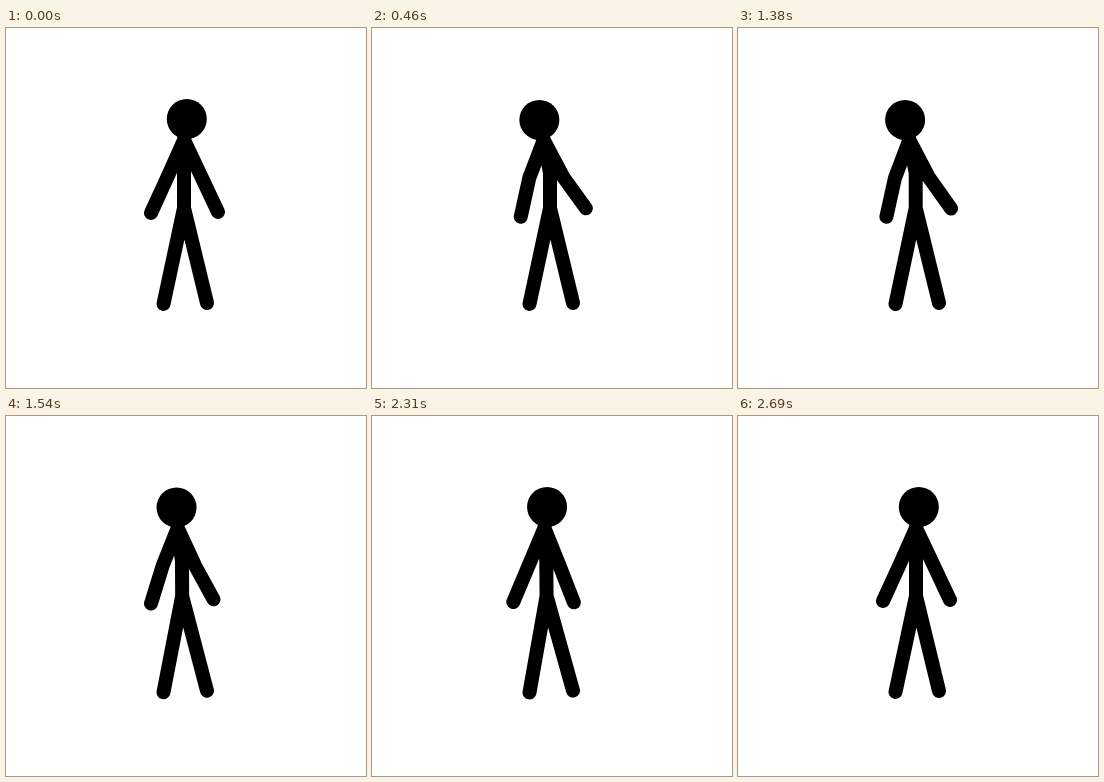
Animation, 360 px wide and 360 px high, one loop 3450 ms. Source, as an HTML page:

```html
<!DOCTYPE html>
<html lang="en">
<head>
<meta charset="utf-8">
<title>Stick figure</title>
<style>
  html, body { margin: 0; width: 100%; height: 100%; overflow: hidden; background: #fff; }
  svg { display: block; width: 100vw; height: 100vh; }
  path { fill: none; stroke: #000; stroke-width: 14; stroke-linecap: round; stroke-linejoin: round; }
</style>
</head>
<body>
<svg viewBox="0 0 360 360">
  <path id="limbs"/>
  <circle id="head" r="20"/>
</svg>
<script>
const LOOP = 3450, STEPS = 45;

const feet = { footL: [157.5, 276], footR: [201, 275] };
const stand = {
  head: [180.8, 91], neck: [178, 112], chest: [178, 145], hip: [178, 180],
  elbowL: [161.5, 149], handL: [145, 185],
  elbowR: [195.5, 149], handR: [212, 184],
  ...feet
};
const lean = {
  head: [166.5, 92], neck: [171.3, 112], chest: [178, 145], hip: [178, 180],
  elbowL: [157, 150], handL: [149, 189],
  elbowR: [191, 149], handR: [214, 180],
  ...feet
};
const shift = {
  head: [174.6, 91], neck: [172, 112], chest: [174, 145], hip: [174.3, 180],
  elbowL: [156.5, 149], handL: [141, 186],
  elbowR: [187, 150], handR: [201, 186.5],
  footL: [157.5, 276.5], footR: [201, 274.5]
};

const settle = [0, 0.074, 0.26, 0.5, 0.73, 0.88, 0.94, 0.97, 0.99, 1];
const glide = [0, 0.074, 0.26, 0.5, 0.74, 0.926, 1];

// Each move holds its start pose until the step after `at`.
const moves = [
  { at: 0, from: stand, to: lean, ease: settle },
  { at: 17, from: lean, to: shift, ease: glide },
  { at: 29, from: shift, to: stand, ease: glide }
];

const chains = [
  ['head', 'neck', 'chest', 'hip'],
  ['neck', 'elbowL', 'handL'],
  ['neck', 'elbowR', 'handR'],
  ['footL', 'hip', 'footR']
];

const limbs = document.getElementById('limbs');
const head = document.getElementById('head');

function poseAt(step) {
  const move = moves.filter(m => m.at <= step).pop();
  const k = move.ease[Math.min(step - move.at, move.ease.length - 1)];
  const pose = {};
  for (const joint in move.from) {
    const [ax, ay] = move.from[joint], [bx, by] = move.to[joint];
    pose[joint] = [ax + (bx - ax) * k, ay + (by - ay) * k];
  }
  return pose;
}

function draw(ms) {
  const tick = Math.floor((ms % LOOP) / 10) * 10;
  const pose = poseAt(Math.floor(tick * STEPS / LOOP));
  limbs.setAttribute('d', chains.map(c => 'M' + c.map(j => pose[j].join(' ')).join('L')).join(''));
  head.setAttribute('cx', pose.head[0]);
  head.setAttribute('cy', pose.head[1]);
}

const start = performance.now();
function loop(now) {
  draw(Math.max(0, now - start));
  requestAnimationFrame(loop);
}
draw(0);
requestAnimationFrame(loop);
</script>
</body>
</html>
```
